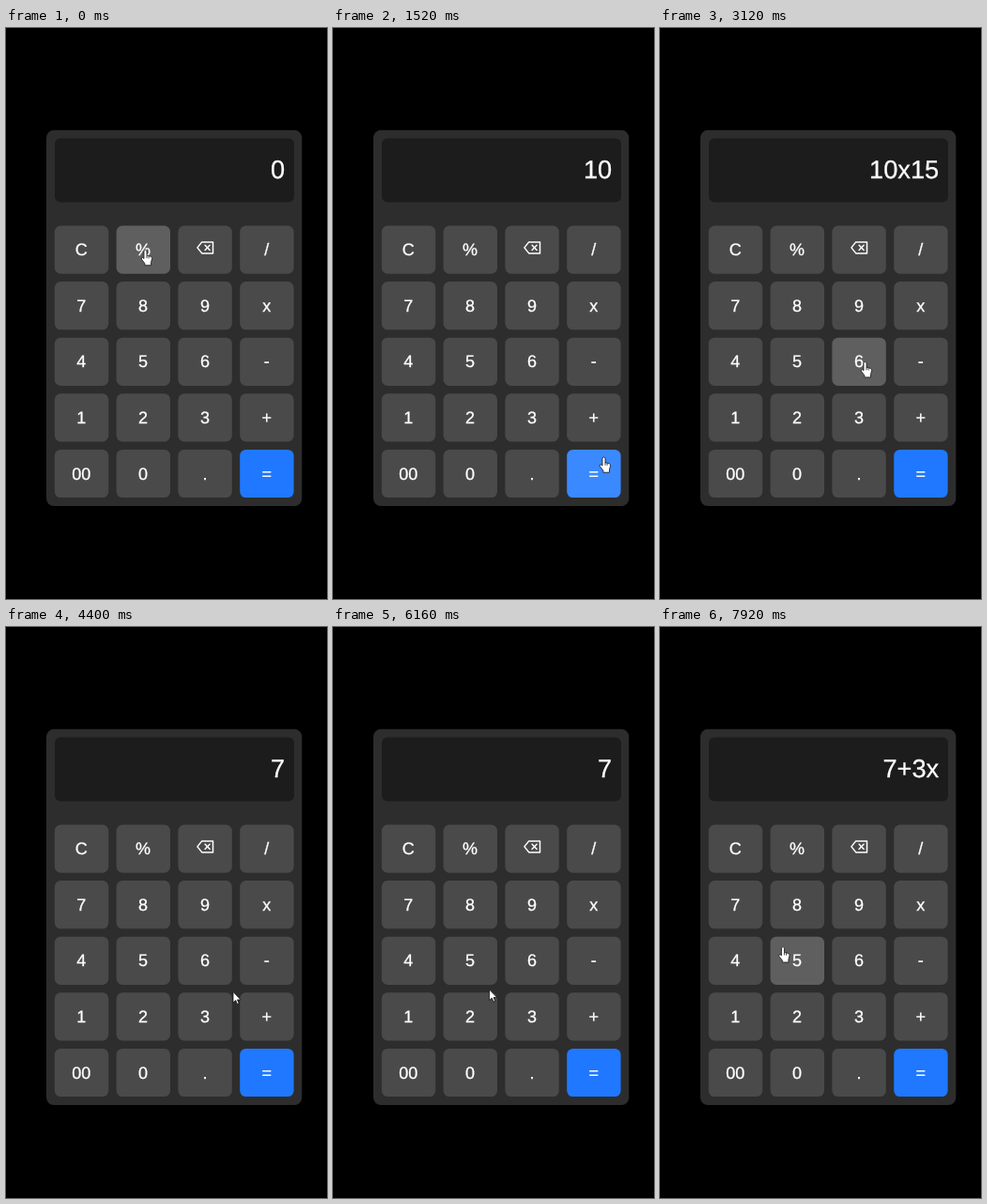
An HTML page for the animation above (8000 ms loop, 342 px wide and 608 px high).

```html
<!DOCTYPE html>
<html lang="en">
<head>
<meta charset="utf-8">
<title>Calculator</title>
<style>
  html, body { margin: 0; width: 100%; height: 100%; overflow: hidden; background: #000; }
  svg { display: block; width: 342px; height: 608px; }
  text { font: 18px "Liberation Sans", Arial, sans-serif; fill: #fff; stroke: #fff; stroke-width: .3;
         text-anchor: middle; text-rendering: geometricPrecision; }
  #readout { font-size: 27.2px; text-anchor: end; }
  .key { fill: #4a4a4a; }
  .key.hover { fill: #5f5f5f; }
  .key.equals { fill: #1f78ff; }
  .key.equals.hover { fill: #3a89ff; }
  .icon { fill: none; stroke: #fff; stroke-width: 1.5; stroke-linejoin: round; stroke-linecap: round; }
  #cursor { fill: #fff; stroke: #111; stroke-width: .8; stroke-linejoin: round; }
</style>
</head>
<body>
<svg viewBox="0 0 342 608">
  <rect width="342" height="608"/>
  <rect x="43" y="108.8" width="272.3" height="400.2" rx="8" fill="#2d2d2d"/>
  <rect x="52" y="117.5" width="255" height="68" rx="6" fill="#1c1c1c"/>
  <text id="readout" x="297.2" y="160.4">0</text>
  <g id="keys"></g>
  <path id="cursor"/>
</svg>
<script>
const DURATION = 8000, STEP = 80, TRAVEL = 230;
const KEY = { x: 51.8, y: 210.5, w: 57.4, h: 51.2, r: 6.5, dx: 65.8, dy: 59.6 };
const LABELS = 'C % ⌫ / 7 8 9 x 4 5 6 - 1 2 3 + 00 0 . ='.split(' ');
const HAND = 'M-1.5 1.2Q0-.8 1.5 1.2V6L5.8 7.2Q7.2 7.8 7.1 9.5L6 13.4V16.6H-.6V14.6L-4.2 10Q-4.5 8-2.8 8.3L-1.5 9.5ZM1.5 6V9M3.6 7V9.2';
const ARROW = 'M0 0V11.5L2.7 9L4.4 13L6.2 12.2L4.5 8.4H8.2Z';

// Keys visited at an even beat; "~" marks hovering without a press.
const PHRASES = [
  { start: 135, beat: 335, keys: '~% 7 + 3 = x 1' },
  { start: 2800, beat: 360, keys: '5 ~6 = C 7' },
  { start: 4533, beat: 293, keys: '+ 3 = C 7 ~C' },
  { start: 6460, beat: 435, keys: '~. + 3 x ~4' }
];

const byId = id => document.getElementById(id);
const readout = byId('readout'), cursor = byId('cursor');

function add(tag, attributes) {
  const node = document.createElementNS('http://www.w3.org/2000/svg', tag);
  for (const name in attributes) node.setAttribute(name, attributes[name]);
  return byId('keys').appendChild(node);
}

const keys = LABELS.map((label, i) => {
  const column = i % 4, row = Math.floor(i / 4);
  const x = KEY.x + column * KEY.dx, y = KEY.y + row * KEY.dy;
  const cx = x + KEY.w / 2, cy = y + KEY.h / 2;
  const node = add('rect', { x, y, width: KEY.w, height: KEY.h, rx: KEY.r,
                             class: label === '=' ? 'key equals' : 'key' });
  if (label === '⌫') {
    add('path', { class: 'icon', transform: `translate(${cx} ${cy - 2.2})`,
                  d: 'M-8.2 0L-3.4-6H8.4V6H-3.4ZM0-2.6L5 2.6M5-2.6L0 2.6' });
  } else {
    add('text', { x: cx - .2, y: cy + 6 }).textContent = label;
  }
  // The pointer rests a little further right on each column.
  return { node, cx, cy, tip: [78.5 + column * 70, cy] };
});

const visits = PHRASES.flatMap(({ start, beat, keys: names }) =>
  names.split(' ').map((name, i) => {
    const label = name.replace('~', ''), time = start + i * beat;
    return { label, time, leave: time - beat, press: name === label,
             tip: keys[LABELS.indexOf(label)].tip };
  }));

function evaluate(text) {
  const [, a, operator, b] = text.match(/^(\d+)(\D)(\d+)$/);
  return String(operator === '+' ? +a + +b : a * b);
}

function type(text, label) {
  if (label === 'C') return '0';
  if (label === '=') return evaluate(text);
  return text === '0' ? label : text + label;
}

const readoutAt = t => visits
  .filter(visit => visit.press && visit.time <= t)
  .reduce((text, visit) => type(text, visit.label), '0');

function pointerAt(t) {
  const i = Math.max(0, visits.findLastIndex(visit => visit.leave <= t));
  const to = visits[i], from = visits[i - 1] || to;
  const p = Math.min(1, Math.max(0, (t - to.leave) / TRAVEL));
  const eased = p * p * (3 - 2 * p);
  return from.tip.map((value, axis) => value + (to.tip[axis] - value) * eased);
}

function overKey(key, x, y) {
  const dx = Math.max(0, Math.abs(x - key.cx) - KEY.w / 2 + KEY.r);
  const dy = Math.max(0, Math.abs(y - key.cy) - KEY.h / 2 + KEY.r);
  return Math.hypot(dx, dy) <= KEY.r;
}

function draw(now) {
  const t = Math.floor(now % DURATION / STEP) * STEP;
  const [x, y] = pointerAt(t);
  const hovered = keys.find(key => overKey(key, x, y));
  for (const key of keys) key.node.classList.toggle('hover', key === hovered);
  cursor.setAttribute('d', hovered ? HAND : ARROW);
  cursor.setAttribute('transform', `translate(${x} ${y})`);
  readout.textContent = readoutAt(t);
}

const start = performance.now();
function tick() {
  draw(performance.now() - start);
  requestAnimationFrame(tick);
}
tick();
</script>
</body>
</html>
```
